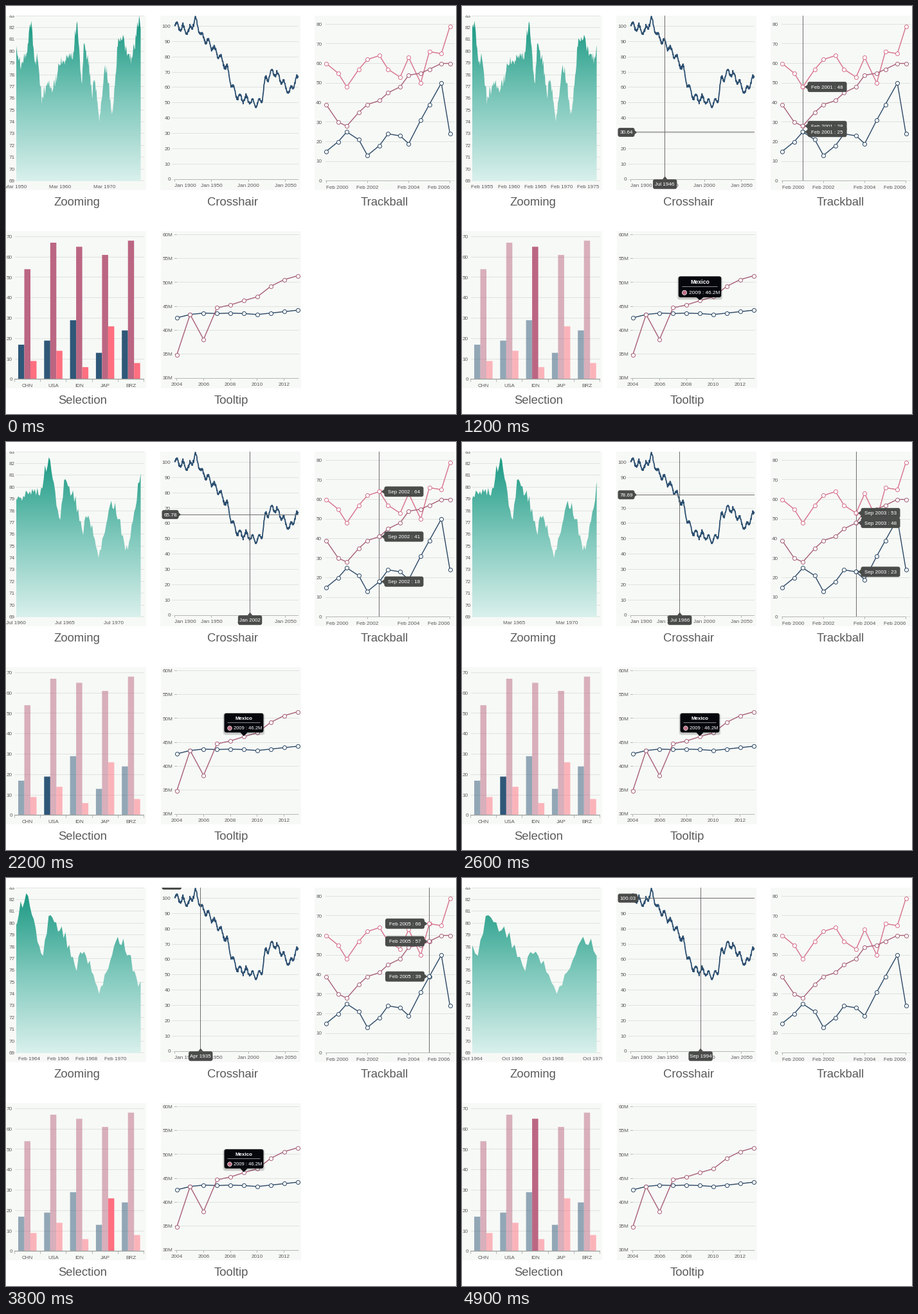
Animation, 700 px wide and 636 px high, one loop 4.93 s. Source, as a matplotlib script:

```python
from itertools import count

import matplotlib.pyplot as plt
import numpy as np
from matplotlib.animation import FuncAnimation
from matplotlib.colors import LinearSegmentedColormap
from matplotlib.patches import Circle, FancyBboxPatch, Polygon, Rectangle

W, H, DPI = 700, 636, 100
FRAMES, INTERVAL = 145, 34
PT = 72 / DPI
plt.rcParams["font.family"] = "Liberation Sans"

BG, GRID, AXIS, INK = "#f7f9f6", "#dfe2df", "#b4b8b6", "#5a5a5a"
NAVY, MAUVE, CORAL = "#2f5778", "#bb6682", "#ff6f80"
NAVY_LINE, MAUVE_LINE, PINK_LINE = "#2b4865", "#a65f78", "#d6708a"
BOX, HAIR = "#4a4c4a", "#6e6e6e"
MONTHS = "Jan Feb Mar Apr May Jun Jul Aug Sep Oct Nov Dec".split()

# whole coordinates fall on pixel centres
fig = plt.figure(figsize=(W / DPI, H / DPI), dpi=DPI, facecolor="white")
ax = fig.add_axes([0, 0, 1, 1])
ax.set_xlim(-.5, W - .5)
ax.set_ylim(H - .5, -.5)
ax.axis("off")
ax.set_autoscale_on(False)

order = count(1)
live = []
rng = np.random.default_rng(7)


# ---- drawing helpers -------------------------------------------------
def put(artist, clip=None):
    artist.set_zorder(next(order))
    if clip is not None:
        artist.set_clip_path(clip)
    live.append(artist)
    return artist


def shape(patch, clip=None):
    return put(ax.add_patch(patch), clip)


def line(xs, ys, color, width=1.0, clip=None):
    return put(ax.plot(xs, ys, color=color, lw=width * PT, snap=False,
                       solid_joinstyle="round", solid_capstyle="butt")[0], clip)


def hline(x0, x1, y, color=AXIS, clip=None):
    line([x0 - .5, x1 + .5], [round(y)] * 2, color, 1, clip)


def vline(x, y0, y1, color=AXIS, clip=None):
    line([round(x)] * 2, [y0 - .5, y1 + .5], color, 1, clip)


def text(x, y, s, size=8.2, color=INK, ha="center", clip=None, weight="normal"):
    t = ax.text(x, y, s, fontsize=size * PT, color=color, ha=ha,
                va="center_baseline", weight=weight, clip_on=clip is not None)
    return put(t, clip)


def rounded(x, y, w, h, color, clip=None, r=3, alpha=1):
    style = f"round,pad=0,rounding_size={r}"
    shape(FancyBboxPatch((x, y), w, h, boxstyle=style, fc=color, lw=0,
                         alpha=alpha), clip)


def arrow(points, color, clip=None):
    shape(Polygon(points, fc=color, lw=0), clip)


def dotted_line(xs, ys, color):
    line(xs, ys, color, 1.4)
    put(ax.plot(xs, ys, ls="none", marker="o", ms=6 * PT, mfc="white",
                mec=color, mew=PT, snap=False)[0])


def panel(x, y, h):
    return shape(Rectangle((x - .5, y - .5), 218, h, fc=BG, lw=0))


def y_axis(values, to_y, label_x, x0, x1, clip, suffix=""):
    for v in values:
        hline(x0, x1, to_y(v), GRID, clip)
        text(label_x, to_y(v), f"{v}{suffix}", ha="right", clip=clip)


def date(year):
    return f"{MONTHS[int(year % 1 * 12)]} {int(year)}"


def track(t, keys):
    times, *values = zip(*keys)
    return [np.interp(t, times, v) for v in values]


# ---- scales ----------------------------------------------------------
def zoom_y(v):
    return 272 - (v - 69) * 18.38


def cross_x(year):
    return 261.6 + (year - 1900) * 1.1514


def cross_y(v):
    return 269.5 - v * 2.385


def ball_y(v):
    return 272 - np.multiply(v, 3.05)


def bar_y(v):
    return 581.5 - v * 3.18


def tip_x(year):
    return 265 + (year - 2004) * 20.9


def tip_y(v):
    return 579.5 - np.subtract(v, 30) * 7.45


# ---- data ------------------------------------------------------------
# turning points as (years since 1950, value), roughened by seeded noise
SWINGS = [(.1, 80.6), (1.3, 78.6), (2.8, 80.6), (3.55, 83), (4.5, 78.8),
          (5, 79.7), (6, 75.8), (7.2, 77.2), (8.5, 76.8), (10, 78.9),
          (12.2, 79.5), (13.2, 80.1), (13.92, 82.6), (14.98, 77.1),
          (15.5, 80.7), (16.5, 79.4), (17.3, 76.2), (17.9, 77.7),
          (19.05, 74.1), (20.22, 79), (20.9, 77.6), (21.9, 74.5),
          (23.2, 81), (24.5, 81), (25.2, 79.6), (26.4, 79.2),
          (27.9, 83.2), (28.3, 81.8)]
zoom_years = np.arange(.1, 28.4, .13)
zoom_values = track(zoom_years, SWINGS)[0] + rng.normal(0, .33, zoom_years.size)

# trend in pixels, plus a regular wave and fine noise
TREND = [(262, 29), (284, 40), (294, 20), (303, 45), (316, 58), (328, 73),
         (344, 98), (350, 122), (360, 142), (376, 146), (390, 154), (398, 144),
         (402, 118), (413, 102), (424, 109), (440, 134), (454, 110)]
walk_x = np.arange(262, 454.2, .4)
walk_y = (track(walk_x, TREND)[0] + 5 * np.cos((walk_x - 388) / 9.8 * 2 * np.pi)
          + rng.normal(0, 1.5, walk_x.size))

half = np.arange(13)
ball_years = 2000 + half // 2 + half % 2 * 7 / 12 + 1.5 / 12
ball_x = 497.5 + 32.1 * (ball_years - ball_years[0])
BALL_SERIES = [
    (PINK_LINE, [60, 55, 48, 57, 62, 64, 57, 53, 63, 50, 66, 65, 79]),
    (MAUVE_LINE, [39, 30, 28, 35, 39, 41, 45, 48, 54, 55, 57, 60, 60]),
    (NAVY_LINE, [15, 20, 25, 21, 13, 18, 24, 23, 19, 31, 39, 50, 24]),
]
BARS = {"CHN": (17, 54, 9), "USA": (19, 67, 14), "IDN": (29, 65, 6),
        "JAP": (13, 61, 26), "BRZ": (24, 68, 8)}
TIP_SERIES = [
    (NAVY_LINE, [42.6, 43.3, 43.6, 43.5, 43.6, 43.5, 43.3, 43.6, 43.9, 44.2]),
    (MAUVE_LINE, [34.8, 43.3, 38.1, 44.7, 45.3, 46.2, 47, 49.2, 50.6, 51.4]),
]

# ---- motion, in seconds ----------------------------------------------
ZOOM_KEYS = [(.6, .17, 28.27), (1.2, 3.15, 26.66), (1.8, 9.67, 23.58),
             (2.5, 11.17, 23.0), (3.3, 11.17, 23.0), (4.2, 14.76, 20.92)]
CROSS_START = .8
CROSS_KEYS = [(.8, 1928, 60), (1.2, 1946.54, 30.64), (1.8, 2037.54, 52.88),
              (2.6, 1966.54, 78.69), (3.3, 1927.45, 109.6),
              (4.3, 1943.2, 107.5), (4.9, 1994.7, 100.03)]
BALL_SPAN = (.8, 4.7)
BALL_KEYS = [(.8, 0), (1.2, 2), (1.8, 4), (2.6, 7), (3.3, 10), (4.3, 11)]
SELECTIONS = [(.9, "IDN", 1), (1.5, "USA", 0), (3.0, "JAP", 2), (3.9, "IDN", 1)]
TIP_SPAN = (1.0, 4.0)
TIP_KEYS = [(.9, .4), (1.2, 1.09), (1.4, 1)]


# ---- fixed parts -----------------------------------------------------
zoom_panel = panel(0, 15, 272)
cross_panel = panel(240, 15, 272)
ball_panel = panel(480, 15, 272)
bar_panel = panel(0, 351, 245)
tip_panel = panel(241, 351, 245)

for cx, cy, name in [(110, 304, "Zooming"), (352, 304, "Crosshair"),
                     (588.5, 304, "Trackball"), (119, 613, "Selection"),
                     (350, 613, "Tooltip")]:
    text(cx, cy, name, 18.5)

y_axis(range(69, 84), zoom_y, 13, 15, 214, zoom_panel)

y_axis(range(0, 101, 10), cross_y, 255.5, 258, 454, cross_panel)
hline(262, 454, cross_y(0))
for year in range(1900, 2051, 50):
    vline(cross_x(year), 270, 273)
    text(max(cross_x(year), 278), 279.5, f"Jan {year}")
line(walk_x, walk_y, "#2c4f70", 1.8, cross_panel)

y_axis(range(0, 81, 10), ball_y, 491, 497, 697, ball_panel)
hline(497, 690, ball_y(0))
for year, x in zip(range(2000, 2007, 2), ball_x[::4]):
    vline(x, 272, 275)
    text(np.clip(x, 515, 673), 282, f"Feb {year}")
for color, values in BALL_SERIES:
    dotted_line(ball_x, ball_y(values), color)

y_axis(range(0, 71, 10), bar_y, 9.5, 14, 214, bar_panel)
bars = {}
for i, (name, values) in enumerate(BARS.items()):
    left = 18.5 + 40.3 * i
    text(left + 14.3, 591, name)
    for j, (v, color) in enumerate(zip(values, (NAVY, MAUVE, CORAL))):
        bars[name, j] = shape(Rectangle((left + 9.5 * j, bar_y(v)), 9.5, v * 3.18,
                                        fc=color, lw=0, snap=False))
hline(13, 214, 581, "#9a9e9c")
for i in range(6):
    vline(12.7 + 40.3 * i, 582, 585)

y_axis(range(30, 61, 5), tip_y, 259, 262, 455, tip_panel, "M")
for v in range(30, 61, 5):
    hline(262, 265, tip_y(v))
hline(265, 454, tip_y(30))
for year in range(2004, 2013, 2):
    vline(tip_x(year), 580, 583)
    text(tip_x(year), 589, str(year))
for color, values in TIP_SERIES:
    dotted_line(tip_x(np.arange(2004, 2014)), tip_y(values), color)

live.clear()

TEAL = LinearSegmentedColormap.from_list("teal", ["#14967f", "#7cc7ba", "#d9f0ec"])
RAMP = np.linspace(0, 1, 256)[:, None]


# ---- moving parts ----------------------------------------------------
def draw_zoom(t):
    start, end = track(t, ZOOM_KEYS)
    span = end - start
    scale = 194 / span
    inside = (zoom_years > start) & (zoom_years < end)
    years = np.r_[start, zoom_years[inside], end]
    xs = 15 + (years - start) * scale
    ys = zoom_y(np.interp(years, zoom_years, zoom_values))
    outline = np.c_[np.r_[15, xs, 209], np.r_[272.5, np.maximum(ys, 14.5), 272.5]]
    area = Polygon(outline, transform=ax.transData)
    put(ax.imshow(RAMP, cmap=TEAL, extent=(15, 209, 272.5, 14.5), aspect="auto",
                  interpolation="bilinear"), area)

    step = 10 if span > 25 else 5 if span > 10 else 2
    month = int(start % 1 * 12) / 12
    for year in range(0, 30, step):
        x = 15 + (year + month - start) * scale
        if 14.5 <= x <= 209:
            text(x, 281.5, date(1950 + year + month + .01), clip=zoom_panel)


def draw_crosshair(t):
    if t < CROSS_START:
        return
    year, value = track(t, CROSS_KEYS)
    x, y = cross_x(year), cross_y(value)
    label = f"{value:.2f}"
    w = 26 if len(label) < 6 else 30.5
    clip = cross_panel
    vline(x, 15, 269, HAIR, clip)
    hline(262, 454, y, HAIR, clip)
    rounded(242, y - 7, w, 14, BOX, clip)
    arrow([(241 + w, y - 4), (245.5 + w, y), (241 + w, y + 4)], BOX, clip)
    text(242 + w / 2, y, label, color="white", clip=clip)
    rounded(x - 18.7, 269.7, 37.4, 15, BOX, clip)
    arrow([(x - 4, 270), (x, 265), (x + 4, 270)], BOX, clip)
    text(x, 277, date(year), 8, "white", clip=clip)


def draw_trackball(t):
    if not BALL_SPAN[0] <= t < BALL_SPAN[1]:
        return
    i = int(track(t, BALL_KEYS)[0] + 1e-6)
    x, side = ball_x[i], 1 if i < 9 else -1
    vline(x, 15, 271, HAIR)
    for color, values in BALL_SERIES:
        y = ball_y(values[i])
        shape(Circle((x, y), 3, fc="white", ec=color, lw=PT))
        mid = x + side * 38
        rounded(mid - 30.5, y - 8, 61, 16, BOX)
        arrow([(x + side * 8, y - 4), (x + side * 3, y), (x + side * 8, y + 4)], BOX)
        text(mid, y, f"{date(ball_years[i])} : {values[i]}", 8, "white")


def draw_selection(t):
    chosen = None
    for begin, name, j in SELECTIONS:
        if t >= begin:
            chosen = name, j
    for key, bar in bars.items():
        bar.set_alpha(1 if chosen in (None, key) else .5)


def draw_tooltip(t):
    if not TIP_SPAN[0] <= t < TIP_SPAN[1]:
        return
    s = track(t, TIP_KEYS)[0]
    cx, cy, ink = 369.5, 437.3, "#05070d"
    for grow in (2, 1):
        rounded(cx - 30.5 * s - grow, cy - 15 * s, 61 * s + 2 * grow,
                30 * s + 2 + grow, "black", r=4, alpha=.1)
    rounded(cx - 30.5 * s, cy - 15 * s, 61 * s, 30 * s, ink, r=3.5)
    base = cy + 15 * s - .5
    arrow([(cx - 6, base), (cx, 458), (cx + 6, base)], ink)
    text(cx, cy - 7.3 * s, "Mexico", 8 * s, "white", weight="bold")
    hline(cx - 25 * s, cx + 25 * s, cy, "#8a8c90")
    shape(Circle((cx - 22 * s, cy + 8.3 * s), 3.3 * s, fc="#c06c84",
                 ec="white", lw=.7 * PT))
    text(cx - 15.5 * s, cy + 8 * s, "2009 : 46.2M", 7.6 * s, "white", ha="left")


def update(i):
    # the picture advances in steps of a tenth of a second
    t = ((i + 1) * INTERVAL - 1) // 100 / 10
    for artist in live:
        artist.remove()
    live.clear()
    for draw in (draw_zoom, draw_crosshair, draw_trackball,
                 draw_selection, draw_tooltip):
        draw(t)
    return []


anim = FuncAnimation(fig, update, frames=FRAMES, interval=INTERVAL,
                     repeat=True, repeat_delay=0, cache_frame_data=False)
plt.show()
```
